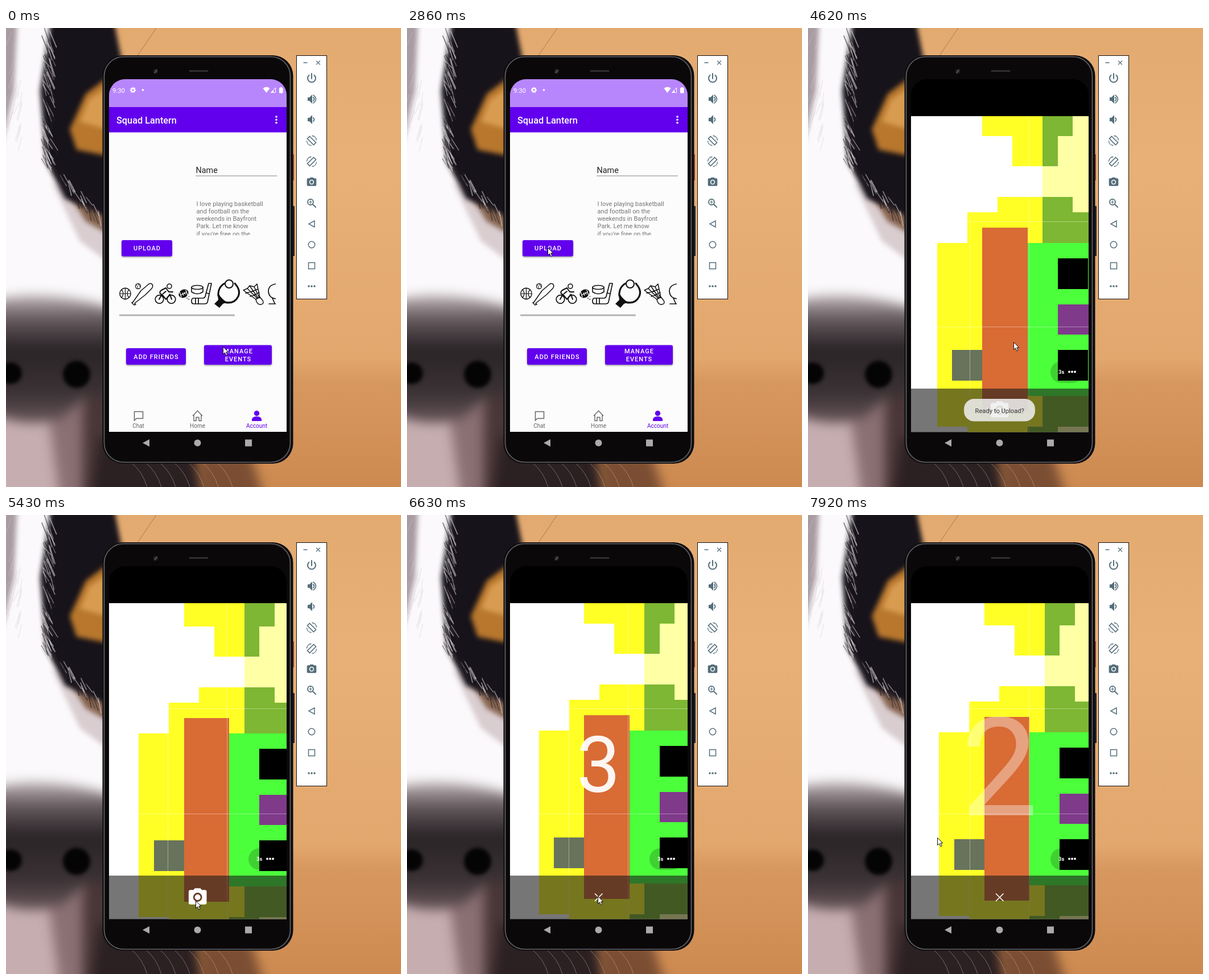
An HTML page with a canvas for the animation above (8000 ms loop, 694 by 807 pixels).

```html
<!DOCTYPE html>
<html lang="en">
<head>
<meta charset="utf-8">
<title>Phone emulator</title>
<style>
html, body { margin: 0; width: 100%; height: 100%; overflow: hidden; background: #e5ad73; }
canvas { display: block; width: 694px; height: 807px; }
</style>
</head>
<body>
<canvas id="stage" width="694" height="807"></canvas>
<script>
const W = 694, H = 807, LOOP = 8000;
const PURPLE = '#6200ee', SLATE = '#546e7a';
const CAMERA = 'M9 2L7.2 4H4Q2 4 2 6V18Q2 20 4 20H20Q22 20 22 18V6Q22 4 20 4H16.8L15 2ZM12 17A5 5 0 0 1 12 7A5 5 0 0 1 12 17ZM12 15.2A3.2 3.2 0 0 0 12 8.8A3.2 3.2 0 0 0 12 15.2Z';
const screen = document.getElementById('stage').getContext('2d');
let g = screen;

// Drawing helpers
function fill(color, d) { g.fillStyle = color; g.fill(new Path2D(d), 'evenodd'); }
function line(color, width, d) {
  g.strokeStyle = color; g.lineWidth = width;
  g.stroke(new Path2D(d));
}
function rect(color, x, y, w, h) { g.fillStyle = color; g.fillRect(x, y, w, h); }
function round(color, x, y, w, h, r) {
  g.fillStyle = color; g.beginPath(); g.roundRect(x, y, w, h, r); g.fill();
}
function dot(color, x, y, rx, ry = rx, turn = 0) {
  g.fillStyle = color; g.beginPath(); g.ellipse(x, y, rx, ry, turn, 0, 7); g.fill();
}
function ring(color, width, x, y, rx, ry = rx, turn = 0) {
  g.strokeStyle = color; g.lineWidth = width;
  g.beginPath(); g.ellipse(x, y, rx, ry, turn, 0, 7); g.stroke();
}
function fade(y0, y1, stops) {
  const paint = g.createLinearGradient(0, y0, 0, y1);
  stops.forEach(s => paint.addColorStop(...s));
  return paint;
}
function text(str, x, y, size, color, { weight = 400, align = 'left', gap = 0 } = {}) {
  g.font = `${weight} ${size}px Roboto, sans-serif`;
  g.letterSpacing = gap + 'px';
  g.textAlign = align;
  g.fillStyle = color;
  g.fillText(str, x + (align === 'center' ? gap / 2 : 0), y);
}
function scoped(draw) { g.save(); draw(); g.restore(); }
function at(x, y, scale, draw) {
  scoped(() => { g.translate(x, y); g.scale(scale, scale); draw(); });
}
function camera(x, y, scale, color) {
  at(x - 12 * scale, y - 12 * scale, scale, () => fill(color, CAMERA));
}
function layer(draw) {
  const c = document.createElement('canvas');
  c.width = W; c.height = H;
  g = c.getContext('2d');
  draw();
  g = screen;
  return c;
}
function randomizer(seed) {
  return () => (seed = (seed * 16807) % 2147483647) / 2147483647;
}

// Interpolates rows of [time, ...values]
function track(t, keys, smooth = true) {
  if (t <= keys[0][0]) return keys[0].slice(1);
  const i = keys.findIndex(k => k[0] > t);
  if (i < 0) return keys[keys.length - 1].slice(1);
  const a = keys[i - 1], b = keys[i];
  let p = (t - a[0]) / (b[0] - a[0]);
  if (smooth) p = p * p * (3 - 2 * p);
  return a.slice(1).map((v, n) => v + (b[n + 1] - v) * p);
}

function wallpaper() {
  rect(fade(0, H, [[0, '#e3aa70'], [.3, '#e8b077'], [.72, '#e2a76d'], [.77, '#d7985f'], [1, '#cd8a50']]), 0, 0, W, H);
  line('#a87a50', 1, 'M264 0L230 50');
  scoped(() => {
    // Forehead, white blaze and brow
    g.filter = 'blur(4px)';
    fill('#fbf9fb', 'M-20 -20H100L190 330V510H-20Z');
    fill('#a89ba1', 'M-20 -20H20L14 110L-20 260Z');
    fill('#d9cdd0', 'M80 270L190 340V420L130 375Z');
    fill('#86644f', 'M100 275L190 310V368L140 340Z');
    fill('#17131a', 'M80 -20H188L204 60L190 338L104 300L70 235L60 110Z');
    fill('#b8772d', 'M185 82L140 116L112 178L124 214L185 226Z');
    fill('#d89c51', 'M185 100L146 126L130 165L185 180Z');
    // Chin, nose and shaded cheek
    g.filter = 'blur(10px)';
    fill('#c6adb0', 'M-20 640H140V830H-20Z');
    fill('#8b7073', 'M70 650H150L160 830H95Z');
    fill('#493638', 'M135 600L200 620V830H135Z');
    fill('#2b2022', 'M165 720H330L355 830H150Z');
    fill('#7b4e33', 'M335 750H430L455 830H345Z');
    fill(fade(465, 700, [[0, '#c9bfc2'], [.2, '#655a5e'], [.42, '#2a2427'], [.75, '#3a3134'], [1, '#6e5b5f']]),
      'M-20 478Q70 455 190 494V640Q130 650 100 685Q40 705 -20 680Z');
    g.filter = 'blur(3px)';
    dot('#050405', 8, 607, 20, 19);
    dot('#050405', 124, 609, 24, 24);
  });
  const rnd = randomizer(71);
  g.lineCap = 'round';
  for (let i = 0; i < 130; i++) {
    const y = rnd() * 330, x = 62 + Math.max(0, y - 230) * .95 + rnd() * 16;
    line(i % 2 ? '#e9e2e688' : '#2b232988', 1 + rnd(), `M${x} ${y}l${4 + rnd() * 10} ${14 + rnd() * 18}`);
  }
  for (let i = 0; i < 25; i++) {
    const x = rnd() * 30, y = rnd() * 200;
    line('#cfc4ca77', 1, `M${x} ${y}l${-4 - rnd() * 5} ${15 + rnd() * 20}`);
  }
  for (let i = 0; i < 7; i++) {
    const x = 220 + i * 25;
    line('#ccb8a777', 1, `M${x} 764Q${x + 20} 780 ${x + 28} 807`);
  }
}

function phone() {
  round('#a04b39', 503, 222, 3, 46, 1);
  round('#242735', 502, 313, 5, 88, 1);
  round('#0d0c0e', 169.5, 48, 335, 718, 36);
  g.strokeStyle = '#66666a'; g.lineWidth = 1.6;
  g.beginPath(); g.roundRect(172.5, 50.5, 327, 713, 34); g.stroke();
  round('#0a0809', 175, 53, 322, 708, 31);
  dot('#252325', 263, 76, 4);
  line('#777', 1.2, 'M261 79L265 74');
  scoped(() => {
    g.setLineDash([4, 2]);
    line('#322f31', 3, 'M323 75.500H354');
  });
  fill('#aaa', 'M252 723V736L240 729.5Z');
  dot('#aaa', 336.5, 729.5, 6);
  rect('#aaa', 420, 723.5, 12, 12);
}

function speaker(y, waves) {
  fill(SLATE, `M530 ${y - 3}h3l5 -5v16l-5 -5h-3Z`);
  line(SLATE, 1.8, `M540 ${y - 3}q3 3 0 6`);
  if (waves) line(SLATE, 1.6, `M540 ${y - 7}q9 7 0 14`);
}
function rotation(y, flip) {
  scoped(() => {
    g.translate(537, y); g.scale(flip, 1);
    line(SLATE, 1.6, 'M-3.500 -7.500L7.500 3.500L3.500 7.500L-7.500 -3.500Z');
    line(SLATE, 1.3, 'M1 -8.500A8.500 8.500 0 0 1 8.500 -1M-1 8.500A8.500 8.500 0 0 1 -8.500 1');
  });
}
function toolbar() {
  rect('#111', 510, 48, 54, 429);
  rect('#fff', 511, 49, 52, 427);
  line(SLATE, 1.3, 'M523 61H529 M545.5 58L551.5 64M551.5 58L545.5 64');
  line(SLATE, 2, 'M537 80V89 M532.5 83A7 7 0 1 0 541.5 83');
  speaker(125, true);
  speaker(161, false);
  rotation(198, 1);
  rotation(235, -1);
  camera(537, 271, .83, SLATE);
  ring(SLATE, 1.8, 535, 306, 5);
  line(SLATE, 2, 'M539 310L544 315');
  line(SLATE, 1.2, 'M532.5 306H537.5M535 303.5V308.5');
  line(SLATE, 1.5, 'M542 339V350L532 344.5Z');
  ring(SLATE, 1.5, 537, 381, 5.7);
  line(SLATE, 1.5, 'M531.5 412.5H542.5V423.5H531.5Z');
  [532, 537, 542].forEach(x => dot(SLATE, x, 454, 1.8));
}

function statusBar(dy) {
  scoped(() => {
    g.translate(0, dy);
    text('9:30', 187, 113.5, 11.4, '#fff');
    g.setLineDash([1.8, 1.8]);
    ring('#fff', 2, 223, 109, 4.2);
    g.setLineDash([]);
    ring('#fff', 2, 223, 109, 2.8);
    dot('#fff', 240.5, 109, 1.7);
    fill('#fff', 'M451.5 106Q457.500 101.500 463.500 106L457.500 114Z');
    line('#fff', 1, 'M465.5 113.5H473.5V105Z');
    fill('#fff', 'M465 114L470 109V114Z');
    round('#fff', 480, 105, 6.5, 9.5, 1);
    rect('#fff', 482, 104, 2.5, 2);
  });
}

function button(x, y, w, h, labels) {
  scoped(() => {
    g.shadowColor = '#0006'; g.shadowBlur = 3; g.shadowOffsetY = 1.5;
    round(PURPLE, x, y, w, h, 3);
  });
  labels.forEach((s, i) => text(s, x + w / 2, y + h / 2 + 4 + (i - (labels.length - 1) / 2) * 13.5,
    11, '#fff', { weight: 500, align: 'center', gap: 1 }));
}

function sports() {
  const ink = '#111';
  scoped(() => {
    g.beginPath(); g.rect(199, 436, 275, 62); g.clip();
    g.lineCap = g.lineJoin = 'round';
    // Basketball, bat and ball
    ring(ink, 1.4, 209.5, 467, 9.7);
    line(ink, 1.2, 'M200 467H219M209.500 457V477M203 460Q209 467 203 474M216 460Q210 467 216 474');
    ring(ink, 1.3, 232, 454, 4.5);
    line(ink, 1, 'M229 452Q232 453 231 457M233 450Q233 454 236 455');
    line(ink, 1.5, 'M223 482L237 462L251 450Q255 448 257 451Q259 454 256 458L245 469L226 484L228 486L225 487L221 483Z');
    // Cyclist
    ring(ink, 1.7, 269.5, 477, 7.3);
    ring(ink, 1.7, 290.5, 477, 7.3);
    ring(ink, 1.6, 287, 454, 4);
    line(ink, 2, 'M269 477L274 468L281 477L288 468L291 477M281 477L276 471L271 467Q269 464 273 461L281 457L286 464H293M276 467L281 463');
    // Football
    dot(ink, 312, 467, 9, 7, -.5);
    line('#fff', 1.3, 'M308 469L316 465M310 466L312 470M313 465L315 468M305 464L308 473M316 461L319 470');
    line(ink, 1.2, 'M317 475H319M321 472H322M320 477H322');
    // Hockey
    ring(ink, 1.6, 336, 456, 10, 3.5);
    line(ink, 1.6, 'M326 456V464Q336 471 346 464V456');
    line(ink, 1.7, 'M356 449H361L354 482Q353 485 349 485H330Q326 485 326 480Q326 475 330 475H346Q349 475 350 472ZM333 475V485M338 475V485M352 466L357 467');
    // Table tennis
    line(ink, 3, 'M384 449Q372 456 373 471L384 482Q401 486 408 472Q413 461 402 449');
    line(ink, 3, 'M373 469Q379 480 388 483');
    fill(ink, 'M372 469L386 483L381 485L375 492L366 485L373 478Z');
    ring(ink, 2, 392, 450, 7);
    // Shuttlecock
    line(ink, 1.5, 'M417 461L439 477M417 461L424 458L428 453L436 455L441 450L446 474M424 458L441 475M428 453L443 475M436 455L445 474M421 466Q431 464 443 459M429 472Q438 469 445 465');
    line(ink, 1.5, 'M439 477L446 473L451 479Q454 485 448 486Q443 487 440 481Z');
    // Next icon, cut by the edge
    line(ink, 1.7, 'M474 450Q461 452 461 463Q462 475 474 476M468 475L472 484M462 485H474');
  });
  round('#b3b3b3', 199, 503.5, 203, 3, 1);
}

function account() {
  rect('#fcfcfc', 181, 90, 312, 620);
  rect('#b886fc', 181, 90, 312, 49);
  statusBar(0);
  rect(PURPLE, 181, 139, 312, 44.5);
  text('Squad Lantern', 194, 168, 16.3, '#fff', { weight: 500 });
  [156, 161.3, 166.6].forEach(y => dot('#fff', 475, y, 1.8));
  text('Name', 333.5, 254.5, 14.4, '#222');
  rect('#858585', 333, 259.5, 143, 1);
  scoped(() => {
    g.beginPath(); g.rect(330, 290, 150, 74.5); g.clip();
    ['I love playing basketball', 'and football on the', 'weekends in Bayfront', 'Park. Let me know', 'if you’re free on the']
      .forEach((s, i) => text(s, 334.5, 312.5 + i * 13.3, 11.1, '#757575'));
  });
  button(203, 373, 89, 28.5, ['UPLOAD']);
  sports();
  button(211, 563, 105, 29, ['ADD FRIENDS']);
  button(348, 557.5, 119, 34.5, ['MANAGE', 'EVENTS']);
  line('#666', 1.5, 'M225.500 674.500H240.500V686.500H229L225.500 690Z');
  line('#666', 1.4, 'M328 682L336.500 673L345 682M330 680V690.500H334V684.500H339V690.500H343V680');
  dot(PURPLE, 440.5, 677.5, 4.7);
  fill(PURPLE, 'M432 691V688Q433 683 440.500 683Q448 683 449 688V691Z');
  ['Chat', 'Home', 'Account'].forEach((s, i) =>
    text(s, 232.5 + i * 104, 702.5, 10, i === 2 ? PURPLE : '#666', { align: 'center' }));
}

// Blocks of the virtual camera view: colour, then left, top, right, bottom in cells
const BLOCKS = [
  ['#ffff26', 0, -9, 4, -6], ['#ffff26', 2, -6, 4, -4],
  ['#ffffa6', 4, -9, 9, -1], ['#7db733', 4, -9, 6, -6], ['#7db733', 4, -6, 5, -4],
  ['#7db733', 4, -2, 6, -1], ['#7db733', 4, -1, 9, 1],
  ['#ffff26', 1, -2, 4, -1], ['#ffff26', -1, -1, 4, 1], ['#ffff26', -3, 1, 4, 13],
  ['#ffff26', -1, 13, 3, 15], ['#4bff3b', 3, 1, 9, 11], ['#7db733', 4, 11, 9, 13],
  ['#7db733', 3, 13, 5, 15], ['#ffffa6', 5, 13, 9, 15], ['#d96b35', 0, 0, 3, 12],
  ['#68735c', -2, 8, 0, 10], ['#000', 5, 2, 7, 4], ['#7f3a8a', 5, 5, 9, 7], ['#000', 5, 8, 7, 10]
];

function viewfinder(t) {
  rect('#000', 181, 90, 312, 620);
  const [ox, oy] = track(t, [[3540, 309, 354], [3810, 311.5, 352], [4620, 306, 351],
    [5430, 312.5, 357], [6624, 311, 352], [7920, 309.5, 355]]);
  scoped(() => {
    g.beginPath(); g.rect(181, 155, 312, 555.5); g.clip();
    rect('#fff', 181, 155, 312, 556);
    const px = c => Math.round(ox + c * 26.5), py = r => Math.round(oy + r * 26.9);
    for (const [color, l, top, r, b] of BLOCKS) rect(color, px(l), py(top), px(r) - px(l), py(b) - py(top));
    line('#ffffff60', 1, 'M284.500 155V710M388.500 155V710M181 340.500H493M181 525.500H493');
    round('#0000002e', 426, 586, 58, 38, 19);
    text('3s', 440, 608, 9.5, '#fff', { weight: 700 });
    [459, 464, 469].forEach(x => dot('#fff', x, 604.5, 1.9));
    rect('#1c1c1c99', 181, 634, 312, 77);
  });
  if (t < 6360) camera(336.7, 672, 1.58, '#fff');
  else line('#fff', 1.6, 'M330 665.500L343.500 679M343.500 665.500L330 679');

  const [veil] = track(t, [[3675, 1], [3810, .71], [4080, 0]], false);
  if (veil > 0) scoped(() => {
    g.globalAlpha = veil;
    rect('#1c1c1c', 181, 139, 312, 571);
    g.globalAlpha = veil * .42;
    camera(337, 424, 2.1, '#fff');
  });
  if (t < 4080) statusBar(track(t, [[3540, 0], [3810, -15], [4070, -32]], false)[0]);

  const [toast] = track(t, [[3540, 0], [3810, 1], [4890, 1], [5160, 0]], false);
  if (toast > 0) scoped(() => {
    g.globalAlpha = toast;
    round('#eeeeeede', 274, 652, 125, 39.5, 18);
    text('Ready to Upload?', 336.7, 676.5, 11.2, '#333', { align: 'center' });
  });
  countdown('3', t - 6490);
  countdown('2', t - 7455);
}

function countdown(digit, age) {
  if (age < 0 || age > 800) return;
  const p = (1 - Math.cos(Math.PI * age / 800)) / 2;
  const size = 124 * (1 + 1.5 * p);
  scoped(() => {
    g.globalAlpha = 1 - p;
    text(digit, 336.5, 434 + .39 * size, size, '#fff', { align: 'center' });
  });
}

function cursor(t) {
  const [x, y] = track(t, [[0, 381, 560], [390, 386, 515], [660, 325, 415], [930, 230, 355],
    [1080, 192, 368], [1200, 240, 400], [1350, 288, 405], [1470, 305.5, 389], [1740, 250, 353],
    [1965, 176, 374], [2160, 228, 403], [2280, 238, 394], [2415, 247, 386], [3675, 247, 386],
    [3810, 250, 385], [4080, 262, 410], [4620, 361, 552], [5025, 345, 650], [5430, 333, 678],
    [5700, 333, 678], [5964, 206, 640], [6228, 320, 668], [6360, 335, 670], [6880, 335, 670],
    [7660, 240, 590], [7920, 227, 567]]);
  at(Math.round(x) + .5, Math.round(y) + .5, 1, () => {
    const arrow = 'M0 0V13L3 10.2L5.300 15.200L7.500 14.200L5.300 9.300H9.300Z';
    fill('#fff', arrow);
    line('#111', 1, arrow);
  });
}

function stepped(t) {
  if (t < 120) return 0;
  const [start, step] = t < 3540 ? [120, 135] : t < 5700 ? [3540, 135] : t < 6750 ? [5700, 132] : [6750, 130];
  return start + Math.floor((t - start) / step) * step;
}

const backdrop = layer(() => { wallpaper(); phone(); toolbar(); });
const home = layer(account);

function render(time) {
  const t = stepped(time);
  g.drawImage(backdrop, 0, 0);
  scoped(() => {
    g.beginPath(); g.roundRect(181, 90, 312, 620.5, [28, 28, 0, 0]); g.clip();
    if (time < 3540) {
      g.drawImage(home, 0, 0);
      if (time >= 2710 && time < 2860) round('#ffffff38', 203, 373, 89, 28.5, 3);
    } else viewfinder(t);
  });
  cursor(t);
}

const begin = performance.now();
function tick() {
  render((performance.now() - begin) % LOOP);
  requestAnimationFrame(tick);
}
tick();
</script>
</body>
</html>
```
